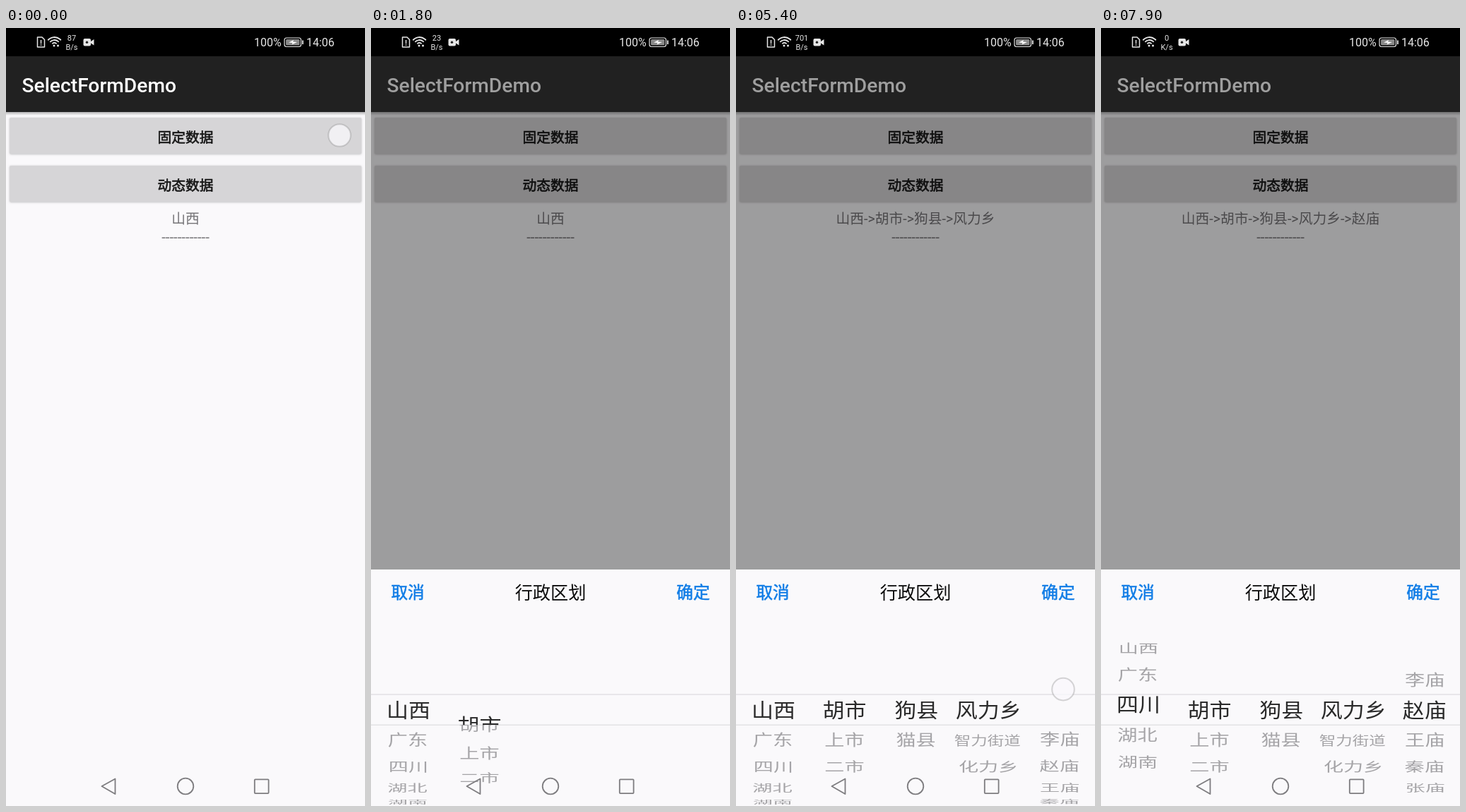
Recreate the animation shown at these times as an HTML page with a canvas. Size 508 by 1102 pixels, loop 8 s.

```html
<!DOCTYPE html>
<html lang="zh-CN">
<head>
<meta charset="utf-8">
<style>
html, body { margin: 0; width: 100%; height: 100%; overflow: hidden; background: #faf9fb; }
canvas { display: block; }
</style>
</head>
<body>
<canvas id="stage" width="508" height="1102"></canvas>
<script>
const ctx = document.getElementById('stage').getContext('2d');
const W = 508, H = 1102, LOOP = 8000, STEP = 100;
const FAMILY = 'Roboto, "Noto Sans CJK SC", "Noto Sans CJK", sans-serif';
const PAPER = '#faf9fb', BLUE = '#117de6', STATUS_INK = '#e6e6e6';

// Wheel geometry
const COL = W / 5, ITEM = 43.2, RADIUS = 137, GLYPH = 27, MID = 965.6;
const LINE_TOP = MID - ITEM / 2, LINE_BOTTOM = MID + ITEM / 2;
const SHEET_TOP = 767, TOUCH_TIME = 400;

const columnCenter = index => COL * (index + .5);

// A column's choice joins the label, and fills the next column, once settled
const columns = [
  { items: ['山西', '广东', '四川', '湖北', '湖南'], choice: '山西', settled: 0,
    swipes: [{ start: 7400, time: 770, by: 3 }] },
  { items: ['', '胡市', '上市', '二市'], choice: '胡市', settled: 2800,
    swipes: [{ start: 1200, time: 600, by: .5 }, { start: 2000, time: 500, by: .5 }] },
  { items: ['', '狗县', '猫县'], choice: '狗县', settled: 3800,
    swipes: [{ start: 3100, time: 600, by: 1 }] },
  { items: ['', '风力乡', '智力街道', '化力乡'], choice: '风力乡', settled: 5000,
    swipes: [{ start: 4000, time: 390, by: 1, press: [404, 958] }] },
  { items: ['', '李庙', '赵庙', '王庙', '秦庙', '张庙'], choice: '赵庙', settled: 6300,
    swipes: [{ start: 5330, time: 870, by: 2, press: [463, 938] }] },
];
const speeds = ['87 B/s', '23 B/s', '701 B/s', '0 K/s'];

const clamp = v => Math.max(0, Math.min(1, v));
const smooth = p => .5 - Math.cos(Math.PI * clamp(p)) / 2;
const travel = (swipe, t) => swipe.by * smooth((t - swipe.start) / swipe.time);
const position = (column, t) => column.swipes.reduce((sum, swipe) => sum + travel(swipe, t), 0);

function text(str, x, y, size, color, align = 'center', weight = 400) {
  ctx.font = `${weight} ${size}px ${FAMILY}`;
  ctx.textAlign = align;
  ctx.fillStyle = color;
  ctx.fillText(str, x, y);
}

// A thin outline gives Chinese glyphs a medium weight
function mediumText(str, x, y, size, color, align) {
  text(str, x, y, size, color, align);
  ctx.strokeStyle = color;
  ctx.lineWidth = .6;
  ctx.strokeText(str, x, y);
}

function rect(x, y, w, h, color) {
  ctx.fillStyle = color;
  ctx.fillRect(x, y, w, h);
}

function roundRect(x, y, w, h, r) {
  ctx.beginPath();
  ctx.roundRect(x, y, w, h, r);
}

function polygon(...points) {
  ctx.beginPath();
  points.forEach(([x, y]) => ctx.lineTo(x, y));
  ctx.closePath();
}

function circle(x, y, r) {
  ctx.beginPath();
  ctx.arc(x, y, r, 0, 2 * Math.PI);
}

function stroke(color, width) {
  ctx.strokeStyle = color;
  ctx.lineWidth = width;
  ctx.stroke();
}

function fill(color) {
  ctx.fillStyle = color;
  ctx.fill();
}

function statusBar(t) {
  rect(0, 0, W, 40, '#000');

  polygon([44.5, 13], [51, 13], [54.5, 16.5], [54.5, 27], [44.5, 27]);
  stroke(STATUS_INK, 1.5);
  text('!', 49.5, 24.5, 11, STATUS_INK, 'center', 700);

  for (let r = 4; r <= 12; r += 4) {
    ctx.beginPath();
    ctx.arc(68.5, 25, r, -Math.PI * .78, -Math.PI * .22);
    stroke(STATUS_INK, 1.8);
  }
  circle(68, 25, 1.5);
  fill(STATUS_INK);
  circle(73.5, 25, 1.5);
  fill(STATUS_INK);

  const [amount, unit] = speeds[Math.floor((t + 1700) / 3000)].split(' ');
  text(amount, 93, 18, 11, STATUS_INK);
  text(unit, 93, 31, 11, STATUS_INK);

  roundRect(109.5, 15, 10.5, 10.5, 2);
  fill(STATUS_INK);
  polygon([120, 19], [124.5, 16], [124.5, 24.5], [120, 21.5]);
  fill(STATUS_INK);
  circle(114.5, 20.2, 1.7);
  fill('#222');

  text('100%', 351, 26, 16, STATUS_INK, 'left');
  roundRect(394, 14, 23.5, 12.5, 3);
  stroke(STATUS_INK, 1.2);
  roundRect(396, 16, 19.5, 8.5, 1.5);
  fill('#8a8a8a');
  polygon([400, 20.5], [407, 17], [406, 19.5], [412, 20], [404.5, 23.5], [405.5, 21]);
  fill('#fff');
  rect(419, 17.5, 1.8, 5.5, STATUS_INK);
  text('14:06', 425, 26, 16, STATUS_INK, 'left');
}

function button(label, y) {
  ctx.save();
  ctx.shadowColor = 'rgba(0,0,0,.22)';
  ctx.shadowBlur = 3;
  ctx.shadowOffsetY = .5;
  roundRect(5, y, 498, 51.5, 2);
  fill('#d6d5d7');
  ctx.restore();
  mediumText(label, W / 2, y + 34.5, 19.75, '#161616');
}

function page(t, dimmed) {
  rect(0, 0, W, H, PAPER);
  const shade = ctx.createLinearGradient(0, 119, 0, 124);
  shade.addColorStop(0, 'rgba(0,0,0,.28)');
  shade.addColorStop(1, 'rgba(0,0,0,0)');
  rect(0, 119, W, 5, shade);
  button('固定数据', 127);
  button('动态数据', 195);
  const label = columns.filter(c => t >= c.settled).map(c => c.choice).join('->');
  text(label, W / 2, 277, 19.75, '#757477');
  text('-'.repeat(12), W / 2, 303, 20.4, '#757477');
  if (dimmed) rect(0, 119, W, H - 119, 'rgba(0,0,0,.373)');
  rect(0, 40, W, 79, '#212121');
  text('SelectFormDemo', 22.5, 90.5, 28.2, dimmed ? '#9f9f9f' : '#fff', 'left', 500);
}

// Text is centred by its ink width but starts at its origin
function wheelText(str, center, baseline, scaleX, color) {
  ctx.font = `${Math.min(28.2, 94 / str.length)}px ${FAMILY}`;
  ctx.textAlign = 'left';
  const m = ctx.measureText(str);
  const ink = (m.actualBoundingBoxLeft + m.actualBoundingBoxRight) * scaleX;
  ctx.translate(center - ink / 2, 0);
  ctx.scale(scaleX, 1);
  ctx.fillStyle = color;
  ctx.fillText(str, 0, baseline);
}

function wheelItem(str, center, angle) {
  const squash = Math.cos(angle);
  const y = MID + RADIUS * Math.sin(angle) - squash * GLYPH / 2;

  function part(selected, top, bottom, scaleY) {
    ctx.save();
    ctx.beginPath();
    ctx.rect(center - COL / 2, top, COL, bottom - top);
    ctx.clip();
    ctx.translate(0, y);
    ctx.scale(1, scaleY);
    if (selected) wheelText(str, center, GLYPH - 2.4, 1.1, '#2a2a2a');
    else wheelText(str, center, GLYPH, 1, '#a5a4a7');
    ctx.restore();
  }

  // Large between the two lines, smaller and grey outside them
  const within = y > LINE_TOP && y + GLYPH < LINE_BOTTOM;
  part(false, 0, LINE_TOP, squash * .8);
  part(false, LINE_BOTTOM, H, squash * .8);
  if (y < LINE_BOTTOM && y + GLYPH > LINE_TOP) {
    part(true, LINE_TOP, LINE_BOTTOM, within ? 1 : squash);
  }
}

function wheel(column, index, t) {
  if (index && t < columns[index - 1].settled) return;
  column.items.forEach((str, i) => {
    const angle = (i - position(column, t)) * ITEM / RADIUS;
    if (str && Math.abs(angle) < 1.5) wheelItem(str, columnCenter(index), angle);
  });
}

function sheet(t) {
  ctx.save();
  ctx.translate(0, (1 - smooth((t - 100) / 400)) * (H - SHEET_TOP));
  rect(0, SHEET_TOP, W, H - SHEET_TOP, PAPER);
  mediumText('取消', 28.5, 808, 23.6, BLUE, 'left');
  mediumText('确定', 479.5, 808, 23.6, BLUE, 'right');
  text('行政区划', W / 2, 808.5, 25.2, '#0a0a0a');
  for (const y of [LINE_TOP, LINE_BOTTOM]) rect(0, y - .6, W, 1.2, '#dddbdf');
  columns.forEach((column, i) => wheel(column, i, t));
  ctx.restore();
}

function navigation() {
  const line = () => stroke('#7d7c7f', 1.8);
  ctx.lineJoin = 'round';
  polygon([135.5, 1074], [154.5, 1063.5], [154.5, 1085]);
  line();
  circle(254, 1074, 11.3);
  line();
  roundRect(351.8, 1064.3, 19.8, 19.8, 1);
  line();
}

function touchDot(x, y) {
  circle(x, y, 15.8);
  fill('rgba(250,248,252,.75)');
  stroke('rgba(128,128,128,.32)', 2);
}

// The finger stays on its column and moves up with the wheel
function touches(t) {
  if (t < STEP) touchDot(472, 152);
  columns.forEach((column, i) => column.swipes.forEach(swipe => {
    if (t < swipe.start || t > swipe.start + TOUCH_TIME) return;
    const [x, y] = swipe.press || [columnCenter(i), MID];
    touchDot(x, y - travel(swipe, t) * ITEM);
  }));
}

function draw(now) {
  const t = Math.floor(now % LOOP / STEP) * STEP;
  const open = t >= STEP;
  page(t, open);
  statusBar(t);
  if (open) sheet(t);
  navigation();
  touches(t);
}

let began;
function frame(now) {
  began ??= now;
  draw(now - began);
  requestAnimationFrame(frame);
}
draw(0);
requestAnimationFrame(frame);
</script>
</body>
</html>
```
